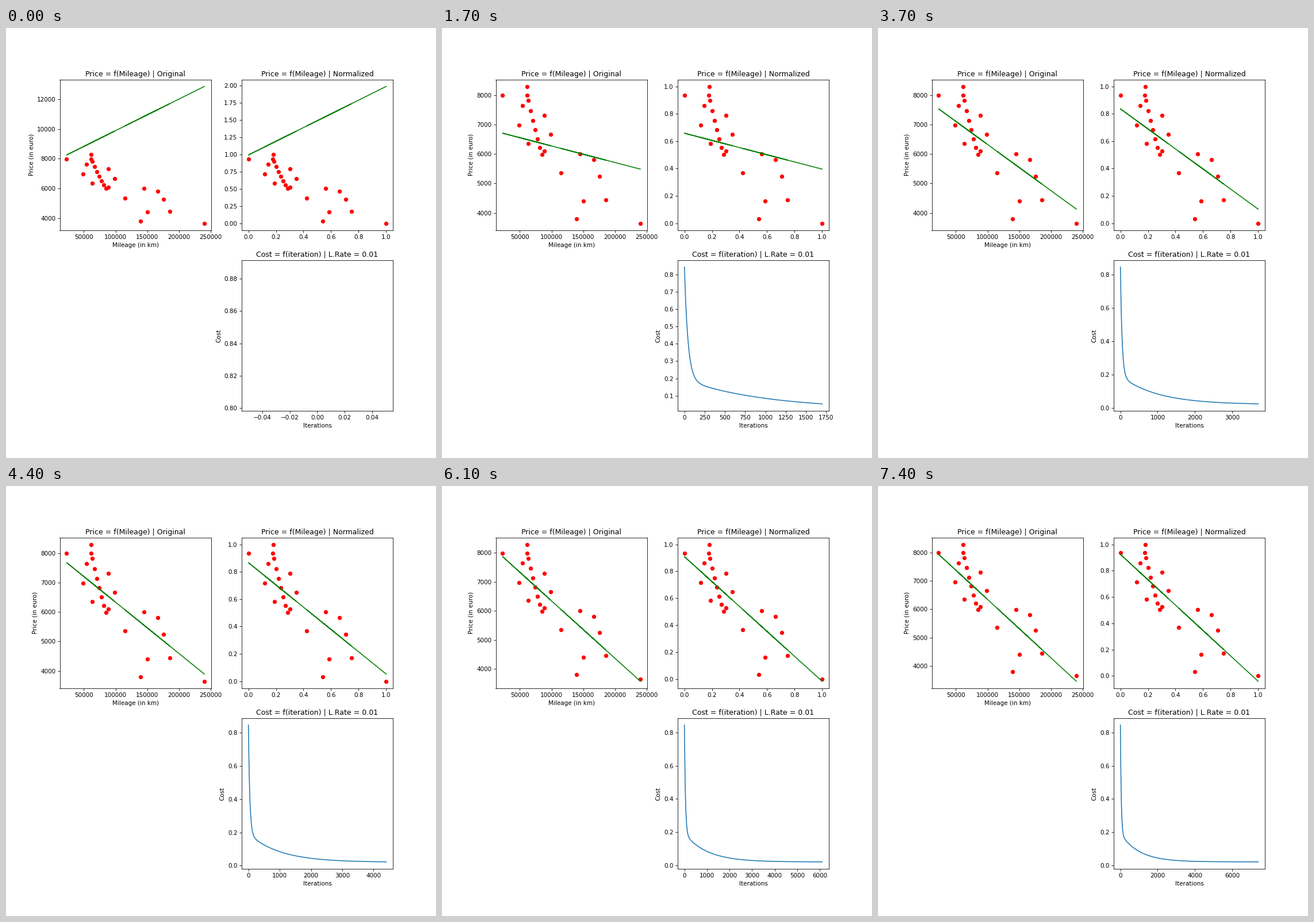
A matplotlib script for the animation above (7.5 s loop, 748 by 748 pixels).

```python
import numpy as np
import matplotlib.pyplot as plt
from matplotlib.animation import FuncAnimation

FRAMES, INTERVAL = 75, 100
STEPS = 100  # gradient descent iterations per frame
RATE = 0.01
SIZE = 748


def make_cars():
    """Well-worn cars, a cluster of mid-range ones, then the two dearest."""
    worn = [(240, 3650), (139.8, 3800), (150.5, 4400), (185.5, 4450),
            (176, 5250), (114.8, 5350), (166.8, 5800), (144.5, 5999)]
    dear = [(22.9, 7990), (61.8, 8290)]
    i = np.arange(14)
    t = i / i[-1]
    wobble = 24 * np.sin(np.pi * t) * np.cos(np.pi / 2 * (i - 5))
    cluster = np.column_stack([84.9 - 1.8 * i + wobble,
                               5990 + 2000 * t ** 1.15])
    km, price = np.vstack([worn, cluster, dear]).T
    return km * 1000, price


def normalize(v):
    return (v - v.min()) / np.ptp(v)


def descend(x, y, count):
    """Return the parameters and the mean squared error after each step."""
    a = b = 1.0
    thetas, costs = [], []
    for _ in range(count):
        err = a + b * x - y
        a, b = a - RATE * err.mean(), b - RATE * (err * x).mean()
        thetas.append((a, b))
        costs.append(((a + b * x - y) ** 2).mean())
    return thetas, costs


km, price = make_cars()
x, y = normalize(km), normalize(price)
thetas, costs = descend(x, y, (FRAMES - 1) * STEPS + 1)

fig = plt.figure(figsize=(10, 10), dpi=SIZE / 10)


def panel(pos, title, xlabel="", ylabel=""):
    ax = fig.add_subplot(2, 2, pos)
    ax.set(title=title, xlabel=xlabel, ylabel=ylabel)
    return ax


raw_ax = panel(1, "Price = f(Mileage) | Original",
               "Mileage (in km)", "Price (in euro)")
norm_ax = panel(2, "Price = f(Mileage) | Normalized")
cost_ax = panel(4, f"Cost = f(iteration) | L.Rate = {RATE}",
                "Iterations", "Cost")

raw_ax.plot(km, price, "ro")
norm_ax.plot(x, y, "ro")
raw_fit, = raw_ax.plot(km, price, color="green")
norm_fit, = norm_ax.plot(x, y, color="green")
cost_line, = cost_ax.plot([], [])


def update(frame):
    last = frame * STEPS
    a, b = thetas[last]
    fit = a + b * x
    norm_fit.set_ydata(fit)
    raw_fit.set_ydata(fit * np.ptp(price) + price.min())
    cost_line.set_data(np.arange(last + 1), costs[:last + 1])
    for ax in (raw_ax, norm_ax, cost_ax):
        ax.relim()
        ax.autoscale_view()
    return raw_fit, norm_fit, cost_line


anim = FuncAnimation(fig, update, frames=FRAMES, interval=INTERVAL,
                     repeat=True, repeat_delay=0, blit=False)
plt.show()
```
